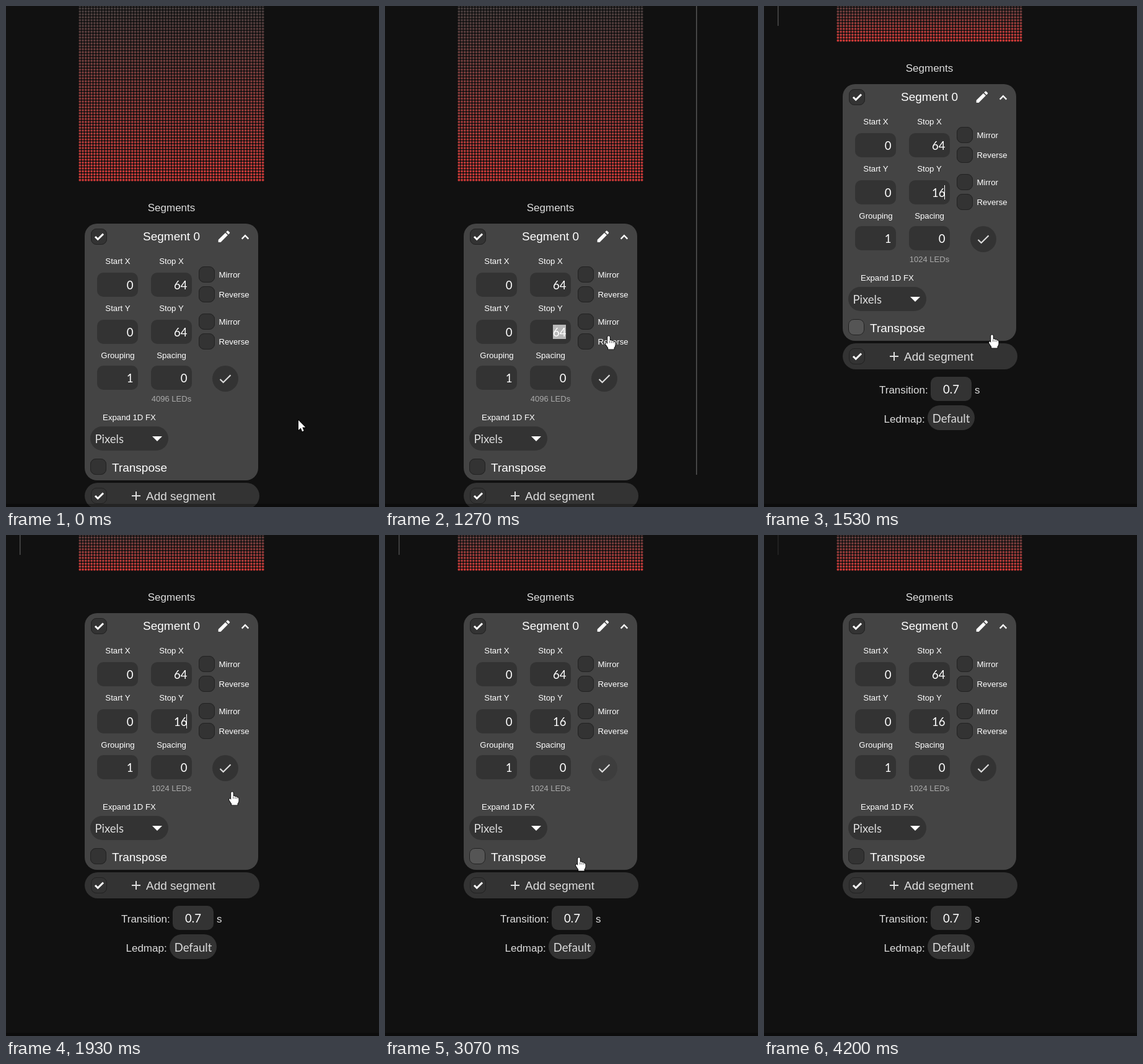
Animation of 602 by 808 pixels, one loop 4.27 s. Source, as an HTML page with a canvas:

```html
<!DOCTYPE html>
<html lang="en">
<head>
<meta charset="utf-8">
<title>Segment settings</title>
<style>
html, body { margin: 0; width: 100%; height: 100%; overflow: hidden; background: #111; }
canvas { display: block; }
</style>
</head>
<body>
<canvas id="stage" width="602" height="808"></canvas>
<script>
const ctx = document.getElementById('stage').getContext('2d');
const LOOP = 4270, TICK = 200 / 3;
const UI = '"Liberation Sans", Arial, sans-serif';
const FIELD = 'Lato, "Noto Sans", sans-serif';

const PENCIL = new Path2D('M3 17.25V21h3.75L17.81 9.94l-3.75-3.75L3 17.25zM20.71 7.04a1 1 0 000-1.41l-2.34-2.34a1 1 0 00-1.41 0l-1.83 1.83 3.75 3.75 1.83-1.83z');
const TICK_MARK = new Path2D('M9 16.2L4.8 12l-1.4 1.4L9 19 21 7l-1.4-1.4L9 16.2z');
const ARROW = new Path2D('M0 0V16L3.7 12.6 6.1 18.2 8.7 17.1 6.3 11.6H11.3Z');
const HAND = new Path2D('M-1.8 1.6Q0 -1 1.8 1.6V7.5Q4 6.4 5 8.3Q7 7.4 8 9.3Q10.4 8.8 10.5 11.4V15.5Q10 18 8.6 19V21.5H-.8V19.5Q-3 16.5-4.8 13.6Q-5.4 11-3.2 11.3L-1.8 13Z');

// Pointer tip: time, x, y
const PATH = [
  [0, 472, 668], [70, 466, 660], [270, 385, 590], [530, 290, 528], [670, 284, 527],
  [870, 254, 527], [1070, 298, 524], [1200, 298, 524], [1270, 361, 532], [1330, 363, 531],
  [1530, 368, 530], [1600, 368, 530], [1870, 366, 430], [2130, 361, 362], [2330, 362, 358],
  [2470, 357, 349], [2600, 354, 366], [2670, 354, 366], [2870, 340, 425], [3070, 313, 520],
  [3200, 288, 583], [3470, 205, 695], [3730, 126, 798]
];

const clamp = (v) => Math.max(0, Math.min(1, v));
const ramp = (t, a, b) => clamp((t - a) / (b - a));
const within = (t, a, b) => t >= a && t < b;

function pointer(t) {
  for (let i = 1; i < PATH.length; i++) {
    const [t0, x0, y0] = PATH[i - 1], [t1, x1, y1] = PATH[i];
    if (t <= t1) {
      const k = ramp(t, t0, t1);
      return [x0 + (x1 - x0) * k, y0 + (y1 - y0) * k];
    }
  }
  return null;
}

function box(x, y, w, h, r, color) {
  ctx.fillStyle = color;
  ctx.beginPath();
  ctx.roundRect(x, y, w, h, r);
  ctx.fill();
}

function text(str, x, y, size, color = '#fff', align = 'left', family = UI) {
  ctx.font = `${size}px ${family}`;
  ctx.textAlign = align;
  ctx.fillStyle = color;
  ctx.fillText(str, x, Math.round(y + size * 0.358));
}

const label = (str, x, y) => text(str, x, y, 13.2, '#fff', 'center');

function line(points, width, color) {
  ctx.strokeStyle = color;
  ctx.lineWidth = width;
  ctx.beginPath();
  points.forEach(([x, y]) => ctx.lineTo(x, y));
  ctx.stroke();
}

function icon(path, x, y, scale, color) {
  ctx.save();
  ctx.translate(x, y);
  ctx.scale(scale, scale);
  ctx.fillStyle = color;
  ctx.fill(path);
  ctx.restore();
}

function checkbox(x, y, checked, color = '#333') {
  box(x - 13, y - 13, 26, 26, 9, color);
  ctx.strokeStyle = '#222';
  ctx.lineWidth = 1;
  ctx.beginPath();
  ctx.roundRect(x - 12.5, y - 12.5, 25, 25, 8.5);
  ctx.stroke();
  if (checked) line([[x - 6, y], [x - 1.8, y + 4.2], [x + 7, y - 4.4]], 3, '#fff');
}

function field(x, y, value, selected, caret) {
  box(x, y, 66, 39, 10, '#333');
  if (selected) box(x + 37, y + 8, 21, 23, 0, '#b8b8b8');
  text(value, x + 58.5, y + 20, 18.5, '#fff', 'right', FIELD);
  if (caret) box(x + 57, y + 8, 1, 23, 0, '#fff');
}

function matrix(rows) {
  const pitch = 300 / 64;
  for (let r = 0; r < rows; r++) {
    const k = rows > 1 ? r / (rows - 1) : 1;
    ctx.fillStyle = `rgb(${62 + 143 * k}, ${62 - 4 * k}, ${62 - 6 * k})`;
    ctx.beginPath();
    for (let c = 0; c < 64; c++) {
      const x = 117 + (c + 0.5) * pitch, y = -17 + (r + 0.5) * pitch;
      ctx.moveTo(x + 1.9, y);
      ctx.arc(x, y, 1.9, 0, 7);
    }
    ctx.fill();
  }
}

function panel(t, state, transposeHover) {
  const { stop, count, tall } = state;
  text('Segments', 267, 325, 17, '#ddd', 'center');
  box(127, 351, 280, tall ? 414 : 379, 20, '#444');
  checkbox(150, 372, true);
  text('Segment 0', 267, 371, 19, '#fff', 'center');
  icon(PENCIL, 339.6, 359.3, 1.03, '#fff');
  line([[380.7, 375.6], [386, 370.2], [391.3, 375.6]], 2.3, '#fff');

  ['X', 'Y'].forEach((axis, i) => {
    const y = i * 76;
    label('Start ' + axis, 180.5, 411 + y);
    label('Stop ' + axis, 267, 411 + y);
    field(147, 430 + y, '0');
    if (i) field(234, 506, stop, within(t, 670, 1330), within(t, 1330, 2000));
    else field(234, 430, '64');
    ['Mirror', 'Reverse'].forEach((name, j) => {
      checkbox(324, 433 + y + j * 32, false);
      text(name, 343.5, 433 + y + j * 32, 13.2);
    });
  });

  label('Grouping', 180.5, 563);
  label('Spacing', 267, 563);
  field(147, 580, '1');
  field(234, 580, '0');
  box(333, 580, 42, 42, 21, within(t, 2130, 3130) ? '#3d3d3d' : '#333');
  icon(TICK_MARK, 341.2, 588.6, 1.05, '#ddd');
  text(count + ' LEDs', 267, 633, 13, '#aaa', 'center');

  label('Expand 1D FX', 199, 663);
  box(136, 678, 126, 39, 19.5, '#333');
  text('Pixels', 143.5, 698, 18.5, '#ddd', 'left', FIELD);
  ctx.fillStyle = '#fff';
  ctx.beginPath();
  ctx.moveTo(236, 694);
  ctx.lineTo(252, 694);
  ctx.lineTo(244, 702);
  ctx.fill();

  if (tall) {
    checkbox(149, 743, false, transposeHover ? '#555' : '#333');
    text('Transpose', 171, 744, 19);
  }
}

function footer(addHover) {
  box(127, 769, 282, 42, 21, addHover ? '#3d3d3d' : '#333');
  checkbox(150, 790, true);
  line([[203, 790], [217, 790]], 2, '#ddd');
  line([[210, 783], [210, 797]], 2, '#ddd');
  text('Add segment', 226, 790, 19, '#ddd');
  text('Transition:', 186, 844, 17, '#ddd');
  box(269, 823, 66, 39, 10, '#333');
  text('0.7', 302, 843, 18.5, '#fff', 'center', FIELD);
  text('s', 340, 844, 17, '#ddd');
  text('Ledmap:', 193.5, 891, 17, '#ddd');
  box(264, 869, 76, 40, 20, '#333');
  text('Default', 302, 890, 18.5, '#ddd', 'center', FIELD);
}

function cursor(t, x, y) {
  const beam = within(t, 470, 1270);
  const hand = within(t, 1270, 1330) || within(t, 1470, 3270);
  ctx.save();
  ctx.translate(Math.round(x), Math.round(y));
  if (beam) {
    const bar = [[0, -8], [0, 8]];
    const top = [[-4, -8], [4, -8]], foot = [[-4, 8], [4, 8]];
    [bar, top, foot].forEach((p) => line(p, 1, '#ddd'));
  } else {
    const shape = hand ? HAND : ARROW;
    ctx.lineWidth = 1.6;
    ctx.strokeStyle = '#000';
    ctx.stroke(shape);
    ctx.fillStyle = '#fff';
    ctx.fill(shape);
  }
  if (hand) {
    [1.8, 4.9, 7.8].forEach((u, i) => line([[u, 8 + i * 0.6], [u, 11.5]], 0.8, '#222'));
  }
  ctx.restore();
}

function edges(t) {
  if (t < 1330) {
    ctx.globalAlpha = ramp(t, 200, 530);
    box(502, 0, 1, 756, 0, '#555');
    box(503, 0, 1, 756, 0, '#333');
  } else {
    ctx.globalAlpha = ramp(t, 1270, 1530) * (1 - 0.65 * ramp(t, 4000, 4200));
    box(22, 0, 1, 32, 0, '#505050');
    box(23, 0, 1, 32, 0, '#2a2a2a');
  }
  ctx.globalAlpha = 1;
}

function stateAt(t) {
  if (t < 1330) return { scroll: 0, rows: 64, stop: '64', count: 4096, tall: true };
  if (t < 1470) return { scroll: 284, rows: 1, stop: '1', count: 64, tall: false };
  return { scroll: 225, rows: 16, stop: '16', count: 1024, tall: true };
}

function draw(t) {
  const state = stateAt(t), tip = pointer(t);
  box(0, 0, 602, 808, 0, '#111');
  matrix(state.rows);
  edges(t);

  ctx.save();
  ctx.translate(0, -state.scroll);
  panel(t, state, t >= 1470 && tip && within(tip[1], 503, 535));
  if (!state.tall) ctx.translate(0, -34);
  footer(tip && within(t, 3130, 3270) && within(tip[1], 544, 587));
  ctx.restore();

  box(0, 803, 602, 5, 0, 'rgba(0, 0, 0, .3)');
  if (tip) cursor(t, ...tip);
}

let last = -1;
const start = performance.now();
function frame() {
  const t = (performance.now() - start) % LOOP;
  const step = Math.min(63, Math.floor((t + 5) / TICK));
  if (step !== last) draw(Math.round(step * TICK / 10) * 10);
  last = step;
  requestAnimationFrame(frame);
}
frame();
</script>
</body>
</html>
```
